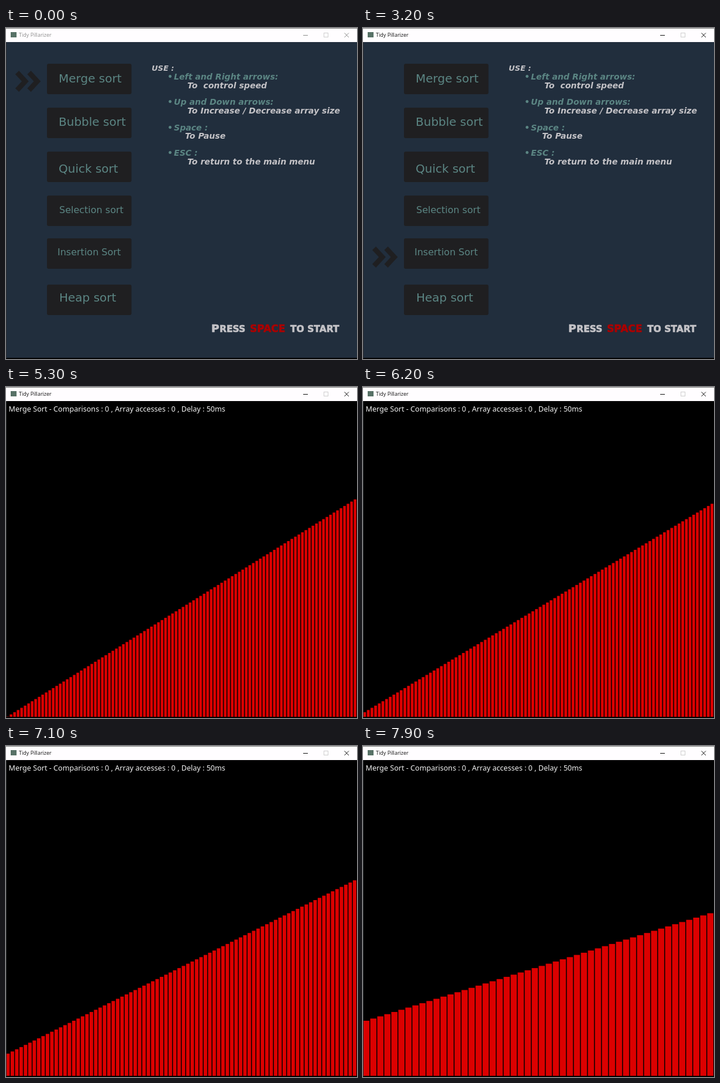
An HTML page with a canvas that plays this animation: 600x565 px, repeating every 8 s.

```html
<!DOCTYPE html>
<html lang="en">
<head>
<meta charset="utf-8">
<title>Tidy Pillarizer</title>
<style>
html, body { margin: 0; width: 100%; height: 100%; overflow: hidden; background: #000; }
canvas { display: block; }
</style>
</head>
<body>
<canvas id="stage" width="600" height="565"></canvas>
<script>
const ctx = document.getElementById('stage').getContext('2d');
const LOOP = 8000, STEP = 100;
const FOCUS_AT = 1000, SORT_AT = 5300;
const NAVY = '#212e3d', DARK = '#1f1f21', TEAL = '#5b8583', PALE = '#c3c2c6', RED = '#dc0000';
const WIDE = '"DejaVu Sans", sans-serif';

// label, x, baseline, font size, top of its button
const ITEMS = [
  ['Merge sort', 90, 93, 20, 61],
  ['Bubble sort', 90, 167, 20, 136],
  ['Quick sort', 90, 247, 20, 211],
  ['Selection sort', 91, 316, 16, 286],
  ['Insertion Sort', 88, 388, 16, 359],
  ['Heap sort', 91, 467, 20, 438]
];
const HELP = [
  ['Left and Right arrows:', 'To  control speed', 310, 88],
  ['Up and Down arrows:', 'To Increase / Decrease array size', 310, 131],
  ['Space :', 'To Pause', 306, 174.5],
  ['ESC :', 'To return to the main menu', 310, 218]
];
// time and selected row
const MOVES = [[0, 0], [2200, 1], [2400, 2], [2700, 3], [3000, 4], [3300, 5],
  [3800, 4], [4100, 3], [4400, 2], [4600, 1], [4800, 0]];

function text(str, x, y, font, color) {
  ctx.font = font;
  ctx.fillStyle = color;
  ctx.fillText(str, x, y);
}

function rect(x, y, w, h, color) {
  ctx.fillStyle = color;
  ctx.fillRect(x, y, w, h);
}

function path(points, color, width) {
  ctx.beginPath();
  points.forEach(([x, y]) => ctx.lineTo(x, y));
  ctx.strokeStyle = color;
  ctx.lineWidth = width;
  ctx.stroke();
}

function titleBar(active) {
  const ink = active ? '#111' : '#8c8c8c';
  rect(0, 0, 600, 24, '#fffdff');
  rect(0, 0, 600, 1, '#777');
  rect(8, 7, 10, 9, '#587267');
  text('Tidy Pillarizer', 22, 15, '9px "Open Sans", sans-serif', ink);
  path([[508, 12.5], [516, 12.5]], ink, 1);
  ctx.strokeStyle = '#cfcfcf';
  ctx.strokeRect(543.5, 8.5, 7, 7);
  path([[578.5, 8.5], [586, 16]], ink, 1);
  path([[586, 8.5], [578.5, 16]], ink, 1);
}

function pointer(y) {
  for (const x of [19, 39.5]) path([[x, y - 15], [x + 14, y], [x, y + 15]], DARK, 8.5);
}

function heavy(str, x, size, color) {
  text(str, x, 519, `bold ${size}px ${WIDE}`, color);
  ctx.strokeStyle = color;
  ctx.lineWidth = 0.7;
  ctx.strokeText(str, x, 519);
}

function menu(t) {
  rect(0, 24, 600, 539, NAVY);
  for (const [label, x, y, size, top] of ITEMS) {
    ctx.beginPath();
    ctx.roundRect(70, top, 144.5, 52, 3);
    ctx.fillStyle = DARK;
    ctx.fill();
    text(label, x, y, `${size}px ${WIDE}`, TEAL);
  }
  const row = MOVES.filter(([at]) => at <= t).pop()[1];
  pointer(91 + 75 * row);

  const font = `italic bold 14.1px ${WIDE}`;
  text('USE :', 249, 73, `italic bold 13px ${WIDE}`, PALE);
  for (const [key, action, x, y] of HELP) {
    text('•', 276, y, font, TEAL);
    text(key, 287, y, font, TEAL);
    text(action, x, y + 14.5, font, PALE);
  }
  heavy('P', 351, 18.5, PALE);
  heavy('RESS', 365, 15.5, PALE);
  heavy('SPACE', 417, 17, '#a90000');
  heavy('TO START', 486, 15.5, PALE);
}

function barCount(t) {
  if (t < 5900) return 100;
  if (t < 6100) return 98;
  return Math.min(96, 80 - 2 * Math.round((t - 7100) / 54));
}

function sortScreen(t) {
  rect(0, 24, 600, 541, '#000');
  text('Merge Sort - Comparisons : 0 , Array accesses : 0 , Delay : 50ms',
    4.5, 42, '500 12.6px "Noto Sans", sans-serif', '#f2f2f2');
  const n = barCount(t), pitch = 600 / n;
  for (let i = 0; i < n; i++) {
    const h = 3.745 * (i + (100 - n) / 2) + 0.4;
    rect(i * pitch + 0.4, 563 - h, pitch - 1.5, h, RED);
  }
}

function draw(now) {
  const t = Math.floor((now % LOOP) / STEP) * STEP;
  rect(0, 0, 600, 565, '#000');
  if (t < SORT_AT) menu(t);
  else sortScreen(t);
  rect(0, 24, 1, 540, '#2b2d30');
  titleBar(t >= FOCUS_AT);
}

const start = performance.now();
function tick() {
  draw(performance.now() - start);
  requestAnimationFrame(tick);
}
tick();
</script>
</body>
</html>
```
